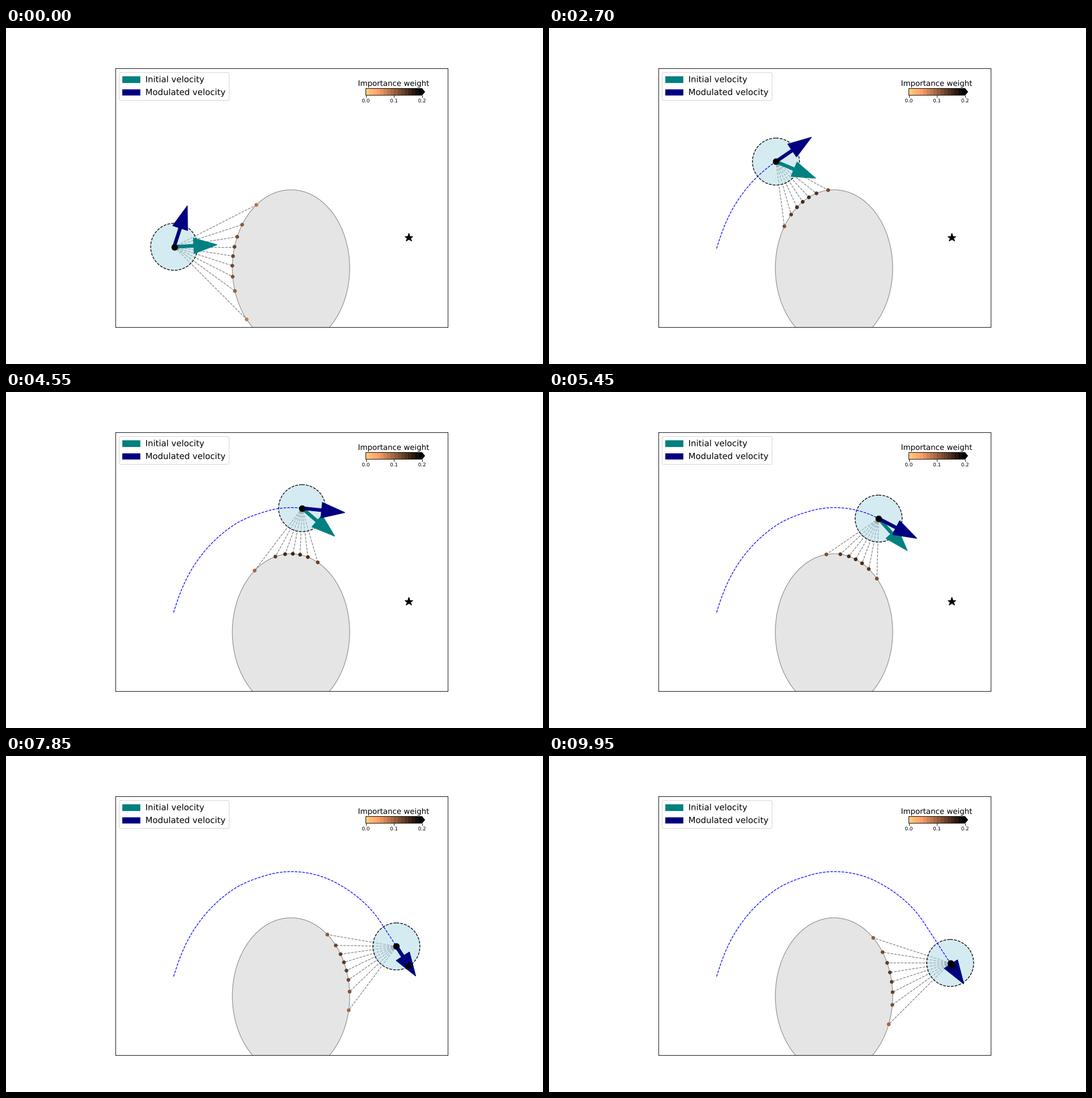
Animation of 947 by 592 pixels, one loop 10000 ms. Source, as a matplotlib script:

```python
import numpy as np
import matplotlib.pyplot as plt
from matplotlib import colormaps
from matplotlib.animation import FuncAnimation
from matplotlib.collections import LineCollection
from matplotlib.patches import (Circle, Ellipse, FancyBboxPatch, PathPatch,
                                Polygon, Rectangle)
from matplotlib.textpath import TextPath
from matplotlib.transforms import Affine2D

# All lengths are stage pixels, with y pointing down.
W, H, DPI = 947, 592, 80
PT = 72 / DPI
LEFT, RIGHT, TOP, BOTTOM = 192.5, 779.2, 71.3, 526.5
FRAMES, INTERVAL = 200, 50

START = np.array([295.5, 388.6])
GOAL = np.array([710.0, 368.5])
CENTER = np.array([502.6, 423.0])
AXES = np.array([103.5, 138.0])
RADIUS = 41.4
SPEED, DECAY = 3.46, 0.05

# Path knots: frame, x, y, heading in degrees (counter-clockwise)
KNOTS = np.array([
    [0, 296.5, 385.5, 73.0],
    [23, 327.5, 312.4, 59.0],
    [54, 400.2, 235.4, 34.0],
    [73, 460.5, 209.8, 16.4],
    [109, 581.3, 223.0, -28.0],
    [140, 660.9, 293.1, -56.9],
])
FINAL_DIR = np.array([0.546, 0.838])
STRAIGHT, SLOWING = 140, 146

RAY_ANGLES = np.radians(np.arange(0, 360, 9))
RAYS = np.column_stack([np.cos(RAY_ANGLES), np.sin(RAY_ANGLES)])
COPPER = colormaps["copper_r"]


def position(n):
    """Robot centre after step n; step -1 is the start."""
    if n < 0:
        return START
    if n >= STRAIGHT:
        dist = 90 - SPEED * (min(n, SLOWING) - STRAIGHT)
        dist *= (1 - DECAY) ** max(n - SLOWING, 0)
        return GOAL - dist * FINAL_DIR
    i = np.searchsorted(KNOTS[:, 0], n, side="right") - 1
    a, b = KNOTS[i], KNOTS[i + 1]
    span = b[0] - a[0]
    s = (n - a[0]) / span
    va, vb = (SPEED * span * np.array([np.cos(h), -np.sin(h)])
              for h in np.radians([a[3], b[3]]))
    return ((2 * s**3 - 3 * s**2 + 1) * a[1:3] + (s**3 - 2 * s**2 + s) * va
            + (3 * s**2 - 2 * s**3) * b[1:3] + (s**3 - s**2) * vb)


def cast(origin):
    """Points where the rays meet the obstacle, and their weights."""
    p, d = (origin - CENTER) / AXES, RAYS / AXES
    a, b, c = (d * d).sum(1), d @ p, p @ p - 1
    disc = b * b - a * c
    hit = (disc > 0) & (b < 0)
    dist = (-b[hit] - np.sqrt(disc[hit])) / a[hit]
    weights = 1 / dist
    return origin + dist[:, None] * RAYS[hit], weights / weights.sum()


def arrow_points(tail, direction, shaft, width=5.2, head=27.6, length=41.4):
    u = direction / np.hypot(*direction)
    v = np.array([-u[1], u[0]])
    neck = tail + shaft * u
    w, h = v * width / 2, v * head / 2
    return [tail + w, neck + w, neck + h, neck + length * u,
            neck - h, neck - w, tail - w]


def label(x, y, text, size, centered=False):
    path = TextPath((0, 0), text, size=size)
    if centered:
        box = path.get_extents()
        x -= (box.x0 + box.x1) / 2
    path = Affine2D().scale(1, -1).translate(x, y).transform_path(path)
    ax.add_patch(PathPatch(path, fc="black", lw=0, zorder=21))


fig = plt.figure(figsize=(W / DPI, H / DPI), dpi=DPI, facecolor="white")
ax = fig.add_axes([LEFT / W, 1 - BOTTOM / H,
                   (RIGHT - LEFT) / W, (BOTTOM - TOP) / H])
ax.set(xlim=(LEFT, RIGHT), ylim=(BOTTOM, TOP), xticks=[], yticks=[])
for spine in ax.spines.values():
    spine.set_linewidth(0.9 * PT)

# Obstacle and goal
ax.add_patch(Ellipse(CENTER, *(2 * AXES), fc=(0.5, 0.5, 0.5, 0.2),
                     ec=(0, 0, 0, 0.42), lw=1.1 * PT, zorder=1))
ax.plot(*GOAL, "*", color="black", ms=15.4 * PT, mew=1.0 * PT, zorder=12)

# Legend
ax.add_patch(FancyBboxPatch((202.5, 81.5), 188, 43,
                            boxstyle="round,pad=3,rounding_size=3",
                            fc="white", ec="0.84", lw=1.0 * PT, zorder=20))
for base, color, name in [(95.5, "teal", "Initial velocity"),
                          (118.1, "navy", "Modulated velocity")]:
    ax.add_patch(Rectangle((205.2, base - 10.4), 30.4, 10.4,
                           fc=color, ec=color, lw=0.8 * PT, zorder=21))
    label(245.7, base, name, 14.88)

# Colour bar
X0, X1, Y0, Y1 = 634.5, 733.5, 106.5, 118.5
ax.imshow(np.linspace(0, 1, 16)[None], cmap=COPPER, aspect="auto",
          extent=(X0, X1, Y1, Y0), interpolation="nearest", zorder=20)
ax.set(xlim=(LEFT, RIGHT), ylim=(BOTTOM, TOP))
mid = (Y0 + Y1) / 2
ax.add_patch(Polygon([(X1, Y0), (X1 + 5, mid), (X1, Y1)],
                     fc="black", lw=0, zorder=20))
ax.add_patch(Polygon([(X0, Y0), (X1, Y0), (X1 + 5, mid), (X1, Y1), (X0, Y1)],
                     fc="none", ec="black", lw=0.9 * PT, zorder=21))
for x, text in zip(np.linspace(X0, X1, 3), ("0.0", "0.1", "0.2")):
    ax.plot([x, x], [Y1, Y1 + 3.8], color="black", lw=0.9 * PT, zorder=21)
    label(x, 131, text, 8.7, centered=True)
label((X0 + X1) / 2, 102, "Importance weight", 13.35, centered=True)

# Moving parts
rays = LineCollection([], colors=[(0, 0, 0, 0.5)], linewidths=1.2 * PT,
                      linestyles="--", zorder=2)
ax.add_collection(rays)
body = Circle(START, RADIUS, fc=(173 / 255, 216 / 255, 230 / 255, 0.5),
              ec="black", ls="--", lw=1.3 * PT, zorder=3)
ax.add_patch(body)
trace, = ax.plot([], [], "--", color="blue", lw=1.25 * PT, zorder=4)
dots = ax.scatter([], [], s=(6.6 * PT) ** 2, linewidths=0, zorder=5)
arrows = [ax.add_patch(Polygon(np.zeros((7, 2)), fc=c, ec=c,
                               lw=1.1 * PT, zorder=z))
          for c, z in (("teal", 6), ("navy", 7))]
core, = ax.plot([], [], "o", color="black", ms=10.9 * PT, mew=0.6 * PT,
                zorder=8)

TRACK = np.array([position(n) for n in range(-1, FRAMES)])


def update(n):
    before, now = TRACK[n], TRACK[n + 1]
    points, weights = cast(TRACK[max(n, 1)])
    rays.set_segments([(now, p) for p in points])
    dots.set_offsets(points)
    dots.set_facecolor(COPPER(weights / 0.2))
    trace.set_data(*TRACK[:n + 2].T)
    body.center = now
    core.set_data([now[0]], [now[1]])

    to_goal = GOAL - before
    shaft = min(10 * SPEED, 10 * DECAY * np.hypot(*to_goal))
    for patch, direction in zip(arrows, (to_goal, now - before)):
        patch.set_xy(arrow_points(now, direction, shaft))
    return [rays, dots, trace, body, core, *arrows]


anim = FuncAnimation(fig, update, frames=FRAMES, interval=INTERVAL,
                     repeat=True, repeat_delay=0)
plt.show()
```
